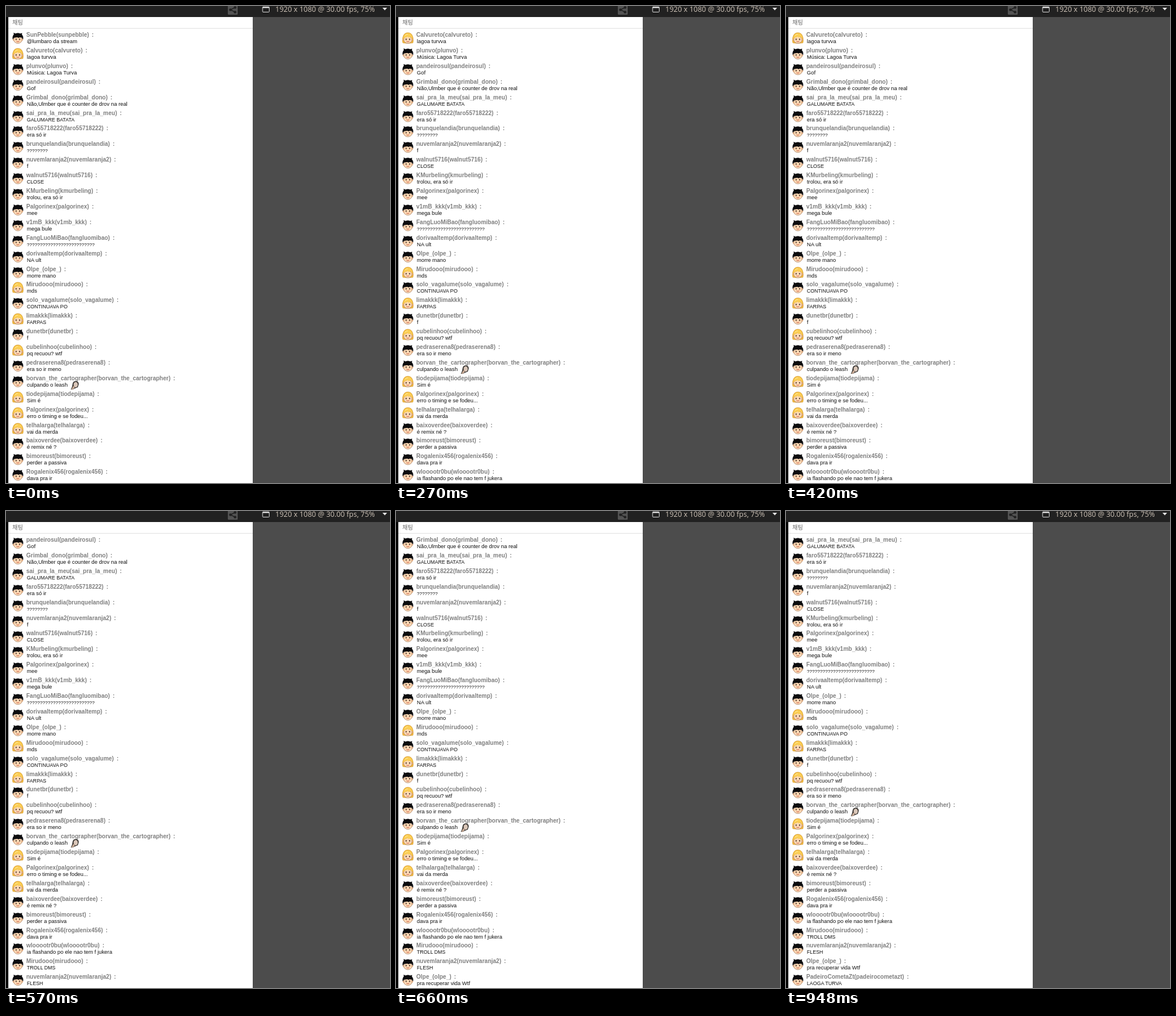
Write an HTML page that moves like this. It is 663 px wide and 822 px high and loops after 1.04 s.

```html
<!DOCTYPE html>
<html lang="pt">
<head>
<meta charset="utf-8">
<title>Chat</title>
<style>
  html, body { margin: 0; width: 100%; height: 100%; overflow: hidden; background: #4c4c4c; }
  svg { display: block; }
  .name { font: bold 10px "Liberation Sans", Arial, sans-serif; fill: #808080; word-spacing: 2px; }
  .msg { font-family: "Liberation Sans", Arial, sans-serif; fill: #111; }
  .title { font: 500 10px "Noto Sans CJK KR", "Noto Sans CJK", sans-serif; fill: #666; }
  .info { font: 12.5px "Open Sans", "Noto Sans", sans-serif; fill: #cfc4b8; }
</style>
</head>
<body>
<svg width="663" height="822" viewBox="0 0 663 822">
  <defs>
    <g id="face">
      <circle cx="2.6" cy="13" r="1.7" fill="#f2b78b"/>
      <circle cx="17.4" cy="13" r="1.7" fill="#f2b78b"/>
      <ellipse cx="10" cy="13.2" rx="7.2" ry="6.2" fill="#fdd9b5" stroke="#9a6a48" stroke-width=".7"/>
      <path d="M6.2 11.3h1.6v2.2h-1.6zM12.2 11.3h1.6v2.2h-1.6z" fill="#2b1a14"/>
      <path d="M7.6 15.8q2.4 1.9 4.8 0" fill="none" stroke="#c8503c"/>
    </g>
    <g id="boy">
      <use href="#face"/>
      <path d="M1 12.5Q0 7 3 4L2.6 1 6 2.4Q10 .8 14 2.4L17.2 1.4 17 4.4Q20 7 19 12.5L17 10.6V9.5L13 9 11.5 10 9 9 3 9.8V10.6Z" fill="#0c0c0e"/>
    </g>
    <g id="girl">
      <path d="M1.4 18.6Q-.4 14 1.6 8 3.5 1 10 1T18.4 8Q20.4 14 18.6 18.6L15 19H5Z" fill="#f6bd3c" stroke="#c98a1e" stroke-width=".6"/>
      <use href="#face"/>
      <path d="M2.4 12Q2 3 10 2.4T17.6 12Q15.8 10.5 15 8L11 9.4 10 7 7.4 9.4 5 8.6Q4 11 2.4 12Z" fill="#fbce55"/>
      <path d="M5 6Q7 3.6 10 3.6" fill="none" stroke="#fff0a8"/>
    </g>
    <g id="emote">
      <path d="M3 5Q4 0 9 .6T13.6 6L12 11 7 13 3 15H0L2 10Z" fill="#3c3835"/>
      <ellipse cx="8.3" cy="6.6" rx="3.6" ry="4.6" fill="#d9c6b8"/>
      <path d="M1 14.5L4 9 7 9.5 6 12.5 3 15Z" fill="#c9ab96"/>
    </g>
  </defs>

  <rect width="663" height="19" fill="#212121"/>
  <rect y="19" width="4" height="803"/>
  <rect x="4" y="19" width="422" height="803" fill="#fff"/>
  <path d="M4 38.5H426" stroke="#e0e0e0"/>
  <text class="title" x="11" y="32">채팅</text>

  <rect x="383" y="-2" width="17" height="17" rx="1.5" fill="#535353"/>
  <g fill="#212121" stroke="#212121" stroke-width="1.4">
    <path d="M395.5 2.5L387.5 6.5 395.5 10.5" fill="none"/>
    <circle cx="395.5" cy="2.5" r="1.6"/><circle cx="387.5" cy="6.5" r="1.6"/><circle cx="395.5" cy="10.5" r="1.6"/>
  </g>
  <rect x="443" y="1.5" width="11.5" height="9" rx="1" fill="none" stroke="#ddd"/>
  <path d="M443 2.5H454.5" stroke="#ddd" stroke-width="2"/>
  <text class="info" x="465" y="10">1920 x 1080 @ 30.00 fps, 75%</text>
  <path d="M650 3H658L654 7.5Z" fill="#e4e4e4"/>

  <g id="chat"></g>
</svg>
<script>
// name|message, a leading * picks the blond avatar
const lines = `SunPebble|@lumbaro da stream
*Calvureto|lagoa turvva
plunvo|Música: Lagoa Turva
pandeirosul|Gof
Grimbal_dono|Não,Ulmber que é counter de drov na real
sai_pra_la_meu|GALUMARE BATATA
faro55718222|era só ir
brunquelandia|????????
nuvemlaranja2|f
walnut5716|CLOSE
KMurbeling|trolou, era só ir
Palgorinex|mee
v1mB_kkk|mega bule
FangLuoMiBao|??????????????????????????
dorivaaltemp|NA ult
Olpe_|morre mano
*Mirudooo|mds
solo_vagalume|CONTINUAVA PO
*limakkk|FARPAS
dunetbr|f
*cubelinhoo|pq recuou? wtf
pedraserena8|era so ir meno
borvan_the_cartographer|culpando o leash
*tiodepijama|Sim é
*Palgorinex|erro o timing e se fodeu...
*telhalarga|vai da merda
baixoverdee|é remix né ?
bimoreust|perder a passiva
Rogalenix456|dava pra ir
wlooootr0bu|ia flashando po ele nao tem f jukera
Mirudooo|TROLL DMS
nuvemlaranja2|FLESH
Olpe_|pra recuperar vida Wtf
PadeiroCometaZt|LAOGA TURVA`.split("\n");

const LOOP = 1040, PITCH = 26.9, TOP = 45;
const arrivals = [270, 520, 570, 660, 810];
const chat = document.getElementById("chat");

const msgSize = s => s[0] === "?" ? 8.1 : /[a-z]/.test(s) ? 9.3 : 8.7;

chat.innerHTML = lines.map(line => {
  const girl = line[0] === "*";
  const [name, msg] = line.slice(girl).split("|");
  const emote = msg.endsWith("leash") ? '<use href="#emote" x="112" y="9"/>' : "";
  return `<g><use href="#${girl ? "girl" : "boy"}" x="10.5"/>
    <text class="name" x="35" y="8">${name}(${name.toLowerCase()}) :</text>
    <text class="msg" x="36" y="19" font-size="${msgSize(msg)}">${msg}</text>${emote}</g>`;
}).join("");
const rows = [...chat.children];

let shown = -1;
function draw() {
  const t = performance.now() % LOOP;
  const first = arrivals.filter(a => t >= a).length;
  if (first !== shown) {
    shown = first;
    rows.forEach((row, i) => {
      row.setAttribute("display", i < first ? "none" : "inline");
      row.setAttribute("transform", `translate(0 ${Math.round(TOP + PITCH * (i - first))})`);
    });
  }
  requestAnimationFrame(draw);
}
draw();
</script>
</body>
</html>
```
